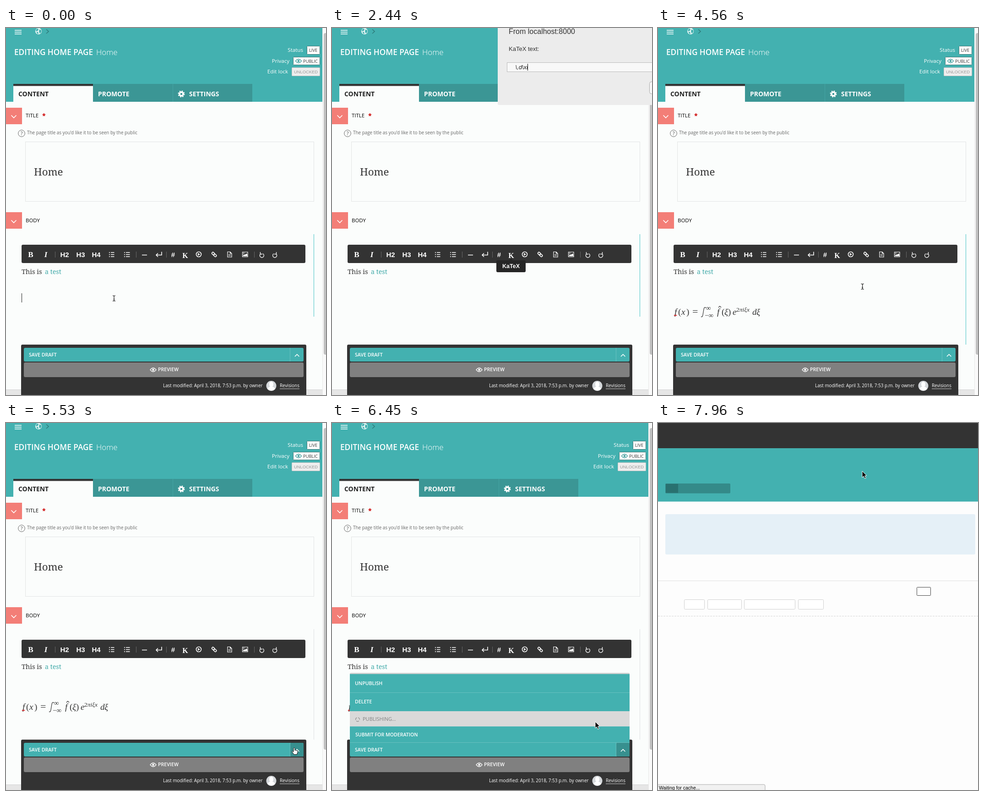
An HTML page for the animation above (8 s loop, 699 by 801 pixels).

```html
<!DOCTYPE html>
<html lang="en">
<head>
<meta charset="utf-8">
<title>Page editor</title>
<style>
html, body { margin: 0; width: 100%; height: 100%; overflow: hidden; background: #fbfdfc; }
svg { display: block; }
text { font-family: "Open Sans", sans-serif; white-space: pre; }
.serif { font-family: "Noto Serif", serif; }
.arial { font-family: "Liberation Sans", Arial, sans-serif; }
.times { font-family: "Liberation Serif", Times, serif; }
.line { fill: none; stroke: #fff; stroke-width: 1.6; }
.tab { font-size: 13.9px; font-weight: 700; fill: #fff; }
.meta { font-size: 11.6px; fill: #fff; text-anchor: end; }
.chip { font-size: 9.4px; fill: #333; }
.label { font-size: 11.4px; }
.btn { font-size: 10.6px; font-weight: 600; fill: #fff; }
.small { font-size: 9.88px; fill: #fff; }
.tool { font-size: 15px; font-weight: 700; fill: #fff; text-anchor: middle; }
.it { font-style: italic; }
.dark { fill: #37908f; }
</style>
</head>
<body>
<svg width="699" height="801" viewBox="0 0 699 801">
<defs>
  <g id="eye"><path d="M-6.500 0Q0-8 6.500 0Q0 8-6.500 0Z" fill="none" stroke="currentColor" stroke-width="1.3"/><circle r="2.300" fill="currentColor"/></g>
  <path id="fold" class="line" d="M-5.500-2.500L0 3L5.500-2.500"/>
</defs>

<g id="editor">
  <rect width="699" height="801" fill="#fbfdfc"/>
  <rect width="691" height="161" fill="#43b1b0"/>
  <path class="line" stroke-width="2" d="M19 5h15M19 9h15M19 13h15"/>
  <circle cx="71" cy="7" r="7" fill="#e4f4f3"/>
  <path fill="#43b1b0" d="M66 3l4-2 1 3-3 3-3-1zM73 3l4 2v4l-3 3-2-4zM66 8l4 1 1 3-2 1z"/>
  <path class="line" style="stroke:#2f7c7b" d="M88 3l5 4.500-5 4.500"/>
  <text x="18" y="59" font-size="17.200" font-weight="600" fill="#fff">EDITING HOME PAGE</text>
  <text x="197" y="59" font-size="17" font-weight="300" fill="#fff">Home</text>

  <text class="meta" x="649" y="52">Status</text>
  <text class="meta" x="619" y="76">Privacy</text>
  <text class="meta" x="616" y="99">Edit lock</text>
  <g fill="#fff" stroke="#3d7675">
    <rect x="657.500" y="39.500" width="28" height="18" rx="1"/>
    <rect x="627.500" y="63.500" width="58" height="17" rx="1"/>
    <rect x="624.500" y="86.500" width="61" height="18" rx="1" fill="#eee" stroke="#c4c4c4"/>
  </g>
  <text class="chip" x="662" y="52">LIVE</text>
  <text class="chip" x="649" y="75.500">PUBLIC</text>
  <use href="#eye" x="639" y="72" color="#43a09f"/>
  <text class="chip arial" x="629" y="99" style="fill:#999">UNLOCKED</text>

  <rect x="190" y="122" width="348" height="39" fill="#3b9695"/>
  <path d="M364.500 122v39" stroke="#43a5a4"/>
  <rect x="16" y="122" width="174" height="40" fill="#fbfdfc"/>
  <rect x="16" y="122" width="174" height="4.500" fill="#333"/>
  <text class="tab" x="27" y="149" style="fill:#222">CONTENT</text>
  <text class="tab" x="201" y="149">PROMOTE</text>
  <text class="tab" x="400" y="149">SETTINGS</text>
  <circle cx="383" cy="144" r="4" fill="none" stroke="#fff" stroke-width="3.500"/>
  <circle cx="383" cy="144" r="6.400" fill="none" stroke="#fff" stroke-width="2.200" stroke-dasharray="2.500 2.526"/>

  <path fill="#f37e77" d="M0 174h35v36H0zM0 402h35v36H0z"/>
  <use href="#fold" x="17" y="193"/>
  <use href="#fold" x="17" y="422"/>
  <text class="label" x="43" y="195">TITLE</text>
  <text x="79" y="197" font-size="14" font-weight="700" fill="#c00">*</text>
  <text class="label" x="43" y="424">BODY</text>
  <circle cx="34" cy="230" r="7.300" fill="none" stroke="#666"/>
  <text x="34" y="234" font-size="11" fill="#555" text-anchor="middle">?</text>
  <text class="small" x="46" y="232" style="fill:#666">The page title as you'd like it to be seen by the public</text>
  <rect x="42.500" y="248.500" width="630" height="130" fill="none" stroke="#e3e5e5"/>
  <text class="serif" x="61" y="322" font-size="22.300" fill="#333">Home</text>

  <path id="edge" fill="none" stroke-width="1.200"/>
  <rect x="34" y="473" width="620" height="40" rx="3" fill="#333"/>
  <path d="M107.500 488v13M284.500 488v13M350.500 488v13M542.500 488v13" stroke="#666"/>
  <text class="tool times" x="54" y="500" style="font-size:17px">B</text>
  <text class="tool times it" x="87" y="500" style="font-size:17px">I</text>
  <text class="tool arial" x="128" y="500">H2</text>
  <text class="tool arial" x="163" y="500">H3</text>
  <text class="tool arial" x="197" y="500">H4</text>
  <text class="tool arial" x="365" y="500">#</text>
  <text class="tool times" x="391.500" y="502" style="font-size:16px">K</text>
  <path class="line" d="M229 490h7.500M229 494.500h7.500M229 499h7.500M262 490h8.500M262 494.500h8.500M262 499h8.500M297 495.500h11M340 488.500v7h-12m4-4l-4 4 4 4"/>
  <path class="line" stroke-dasharray="2 2.500" d="M226 489v11M259 489v11"/>
  <circle class="line" cx="421" cy="494" r="5.500"/>
  <path fill="#fff" d="M419 491l5 3-5 3z"/>
  <g class="line" transform="rotate(45 454.500 494.500)"><rect x="448.500" y="492" width="6.500" height="4.500" rx="2"/><rect x="454" y="492" width="6.500" height="4.500" rx="2"/></g>
  <path class="line" style="stroke-width:1.200" d="M484 488.500h5.500l3.500 3.500v8h-9zM489.500 488.500v3.500h3.500M486 494.500h5M486 497h5M516.500 489h11.500v10.500h-11.500z"/>
  <path fill="#fff" d="M518 498v-2l2-2 2 1 3-3 2 2.500V498zM518.500 490.500h2v2h-2z"/>
  <path class="line" style="stroke-width:1.300" d="M555.500 493.500A4.500 4.500 0 1 0 561 492.500M555.500 489v4.500h4.500M590.500 493.500A4.500 4.500 0 1 1 585 492.500M590.500 489v4.500h-4.500"/>

  <text class="serif" x="34" y="537" font-size="14.600" fill="#333">This is</text>
  <text class="serif" x="85" y="537" font-size="14.200" fill="#3fa9a8">a test</text>
  <path id="caret" d="M34.500 579v20" stroke="#222"/>
  <g id="formula" fill="#333">
    <text class="times" y="626" font-size="19"><tspan class="it" x="36">f</tspan><tspan x="44">(</tspan><tspan class="it" x="51">x</tspan><tspan x="62">)</tspan><tspan x="75" font-size="22">=</tspan><tspan class="it" x="129">f</tspan><tspan x="139">(</tspan><tspan class="it" x="145">ξ</tspan><tspan x="153">)</tspan><tspan class="it" x="163">e</tspan><tspan class="it" x="206">d</tspan><tspan class="it" x="215">ξ</tspan></text>
    <text class="times it" font-size="13.500" x="171" y="619"><tspan font-style="normal">2</tspan>πiξx</text>
    <text class="times" font-size="15"><tspan x="105" y="616">∞</tspan><tspan x="102" y="632">−∞</tspan></text>
    <path d="M105 611q-3.500-4-5 3l-2 12q-1 6-4 4M132 610l3-3 3 3" fill="none" stroke="#333" stroke-width="1.200"/>
    <path d="M35 628l1.500-1.500 1.500 1.500 1.500-1.500 1.500 1.500" fill="none" stroke="#d22" stroke-width="1.300"/>
  </g>
  <g id="tip">
    <path fill="#262626" d="M362 507h25l4-4 4 4h25q3 0 3 3v20q0 3-3 3h-58q-3 0-3-3v-20q0-3 3-3z"/>
    <text class="arial" x="391" y="524" font-size="12.500" font-weight="700" fill="#fff" text-anchor="middle">KaTeX</text>
  </g>

  <rect y="789" width="691" height="12" fill="#e6e6e6"/>
  <path d="M0 789.500h691" stroke="#d2d2d2"/>
  <rect x="33" y="691" width="623" height="114" rx="3" fill="#333"/>
  <g id="menu">
    <rect x="39" y="545.500" width="611" height="5" rx="2" fill="#c8cccc"/>
    <rect x="39" y="548" width="611" height="156" fill="#43b1b0"/>
    <rect id="pubRow" class="dark" x="39" y="629" width="611" height="33"/>
    <rect id="subRow" class="dark" x="39" y="662" width="611" height="35"/>
    <path d="M39 588.500h611M39 629.500h611M39 662.500h611" stroke="#68c0bf"/>
    <text class="btn" x="50" y="572">UNPUBLISH</text>
    <text class="btn" x="50" y="612">DELETE</text>
    <text class="btn" id="publish" x="51" y="650">PUBLISH</text>
    <text class="btn" x="51" y="684">SUBMIT FOR MODERATION</text>
    <g id="busy">
      <rect x="39" y="629" width="611" height="33" fill="#d9d9d9"/>
      <circle id="spin" cx="56" cy="647" r="4.300" fill="none" stroke="#8a8a8a" stroke-width="1.200" stroke-dasharray="6 3"/>
      <text class="btn" x="67" y="650" style="fill:#808080;font-weight:400;font-size:11px">PUBLISHING…</text>
    </g>
  </g>
  <rect x="39" y="698" width="611" height="30" rx="3" fill="#43b1b0"/>
  <rect id="saveRow" class="dark" x="39" y="698" width="581" height="30"/>
  <rect id="arrowBtn" class="dark" x="621" y="698" width="29" height="30" rx="2"/>
  <path id="saveTop" d="M39 697.500h611" stroke="#68c0bf"/>
  <path d="M620.500 698v30" stroke="#68c0bf"/>
  <path class="line" d="M631 717l4.700-4.700 4.700 4.700"/>
  <text class="btn" x="50" y="717">SAVE DRAFT</text>
  <rect x="39" y="730" width="611" height="32" rx="3" fill="#808080"/>
  <use href="#eye" x="321.500" y="746" color="#fff"/>
  <text class="btn" x="332" y="749">PREVIEW</text>
  <text class="small" x="343" y="784">Last modified: April 3, 2018, 7:53 p.m. by owner</text>
  <circle cx="579.500" cy="781" r="11" fill="#d5d8db"/>
  <path fill="#fff" d="M575 777a4.500 5 0 0 1 9 0q0 4-2 6 5 1 6 5-8 7-17 0 1-4 6-5-2-2-2-6z"/>
  <text class="small" x="598" y="784">Revisions</text>
  <path d="M598 787.500h43" stroke="#ccc"/>

  <rect x="691" width="8" height="801" fill="#fafafa"/>
  <path d="M691.500 0v801" stroke="#e8e8e8"/>
  <rect x="694" y="11" width="8" height="702" rx="4" fill="#c1c1c1"/>

  <g id="dialog">
    <rect x="362" y="-42" width="500" height="210" rx="3" fill="#ececec"/>
    <text class="arial" x="386" y="13" font-size="16" fill="#333">From localhost:8000</text>
    <text class="arial" x="386" y="50" font-size="13" fill="#333">KaTeX text:</text>
    <rect x="382.500" y="75.500" width="420" height="20" fill="#f8f8f8" stroke="#bbb"/>
    <rect id="mark" x="386" y="77" width="126" height="16" fill="#6fdc85"/>
    <text class="arial it" id="field" x="386" y="89.500" font-size="13" fill="#222"></text>
    <path id="fieldCaret" d="M427.500 78v15" stroke="#111"/>
    <rect x="693.500" y="117.500" width="80" height="26" rx="4" fill="#f6f6f6" stroke="#aaa"/>
    <text class="arial" x="709" y="135" font-size="13" fill="#333">Cancel</text>
  </g>
</g>

<g id="listing">
  <rect width="699" height="801" fill="#fdfdfd"/>
  <rect width="699" height="55" fill="#333"/>
  <rect y="55" width="699" height="116.500" fill="#43b1b0"/>
  <rect x="16" y="132" width="142" height="21.500" rx="2" fill="#348a89"/>
  <rect x="17" y="133" width="27" height="19.500" fill="#297170"/>
  <rect x="16" y="199" width="677" height="88" rx="3" fill="#e5f0f7"/>
  <path d="M0 344.500h699" stroke="#e0e0e0"/>
  <path d="M0 421.500h699" stroke="#d5d5d5" stroke-dasharray="4 2"/>
  <g fill="#fff" stroke="#d0d0d0">
    <rect x="565.500" y="358.500" width="30" height="18" rx="1" stroke="#444"/>
    <rect x="57.500" y="385.500" width="44" height="21" rx="2"/>
    <rect x="108.500" y="385.500" width="74" height="21" rx="2"/>
    <rect x="188.500" y="385.500" width="111" height="21" rx="2"/>
    <rect x="306.500" y="385.500" width="55" height="21" rx="2"/>
  </g>
</g>

<g id="status">
  <path d="M-1 789h232q3 0 3 3v12H-1z" fill="#f1f1f1" stroke="#aaa"/>
  <text class="arial" x="2" y="800" font-size="10.500">Waiting for cache...</text>
</g>

<g id="pointer">
  <path id="beam" d="M-3-6q3 0 3 2 0-2 3-2M0-4V4M-3 6q3 0 3-2 0 2 3 2M-1.500 2h3" fill="none" stroke="#222" stroke-width="1.200"/>
  <path id="arrow" d="M0 0v14l3.300-3 2.400 5.300 2.500-1.100-2.400-5.200H10z" fill="#000" stroke="#fff"/>
  <path id="hand" d="M-2 1.500C-2-.5 1-.5 1 1.500V5.500Q3 4 4 6Q6 5 7 7Q8 8 7 10Q6 12 5.500 14.500H-1Q-3 11-5.500 8.500Q-5.500 6.500-2 8.500Z" fill="#fff" stroke="#111"/>
</g>
</svg>
<script>
const el = id => document.getElementById(id);
const show = (id, on) => { el(id).style.display = on ? "" : "none"; };
const ramp = (t, a, b) => Math.min(1, Math.max(0, (t - a) / (b - a)));
const easeOut = u => 1 - (1 - u) ** 2;
const smooth = u => u * u * (3 - 2 * u);

// time, x, y
const path = [
  [0, 236, 590], [470, 236, 590], [1220, 383, 499], [4300, 400, 520],
  [4330, 400, 520], [5080, 606, 716], [5200, 630, 709], [5700, 630, 709],
  [5760, 616, 709], [5990, 585, 668], [6100, 575, 652], [7420, 575, 652],
  [7600, 673, 201], [7720, 673, 201], [7960, 446, 105], [8000, 446, 105]
];

function pointer(t) {
  if (t > 1220 && t < 4300) return [383, 499];
  let i = 1;
  while (path[i][0] <= t) i++;
  const [a, b] = [path[i - 1], path[i]];
  const u = smooth(ramp(t, a[0], b[0]));
  return [a[1] + (b[1] - a[1]) * u, a[2] + (b[2] - a[2]) * u];
}

function draw(t) {
  const within = (a, b) => t >= a && t < b;
  const [x, y] = pointer(t);
  const overText = t < 5080 && y > 515 && y < 691;
  const overLink = within(4330, 6330) && y >= 698 || within(5590, 6330);
  el("pointer").setAttribute("transform", `translate(${x} ${y})`);
  show("pointer", !within(2040, 4330));
  show("beam", overText);
  show("hand", overLink);
  show("arrow", !overText && !overLink);

  show("caret", t < 230 || within(760, 1220));
  show("tip", within(2100, 3820));
  show("formula", t >= 3820);
  el("edge").setAttribute("d", `M672.5 450V${t < 3820 ? 630 : 691}`);
  el("edge").setAttribute("stroke", t < 5440 ? "#62cbce" : "#e3e5e5");

  const p = easeOut(ramp(t, 1450, 1680)) * (1 - ramp(t, 3460, 3560));
  const pasted = t >= 2200;
  show("dialog", p > 0);
  el("dialog").setAttribute("opacity", p);
  el("dialog").setAttribute("transform",
    `translate(530 -42) scale(${0.8 + 0.2 * p}) skewX(${-7.3 * (1 - p)}) translate(-530 42)`);
  show("mark", !pasted);
  el("field").textContent = pasted ? "    \\,d\\xi" : "c = pmsqrt{a^2 + b^2}";
  show("fieldCaret", within(2200, 2740) || t >= 3280);

  const open = t >= 5590;
  show("menu", open);
  show("saveTop", open);
  show("saveRow", within(4980, 5140));
  show("arrowBtn", t >= 5140);
  show("subRow", within(5930, 5990));
  show("pubRow", within(5990, 6330));
  show("busy", t >= 6330);
  el("spin").setAttribute("transform", `rotate(${Math.min(t, 7070) * 0.36} 56 647)`);
  show("status", t >= 7190);
  show("editor", t < 7960);
  show("listing", t >= 7960);
}

function tick(now) {
  draw(now % 8000);
  requestAnimationFrame(tick);
}
requestAnimationFrame(tick);
</script>
</body>
</html>
```
